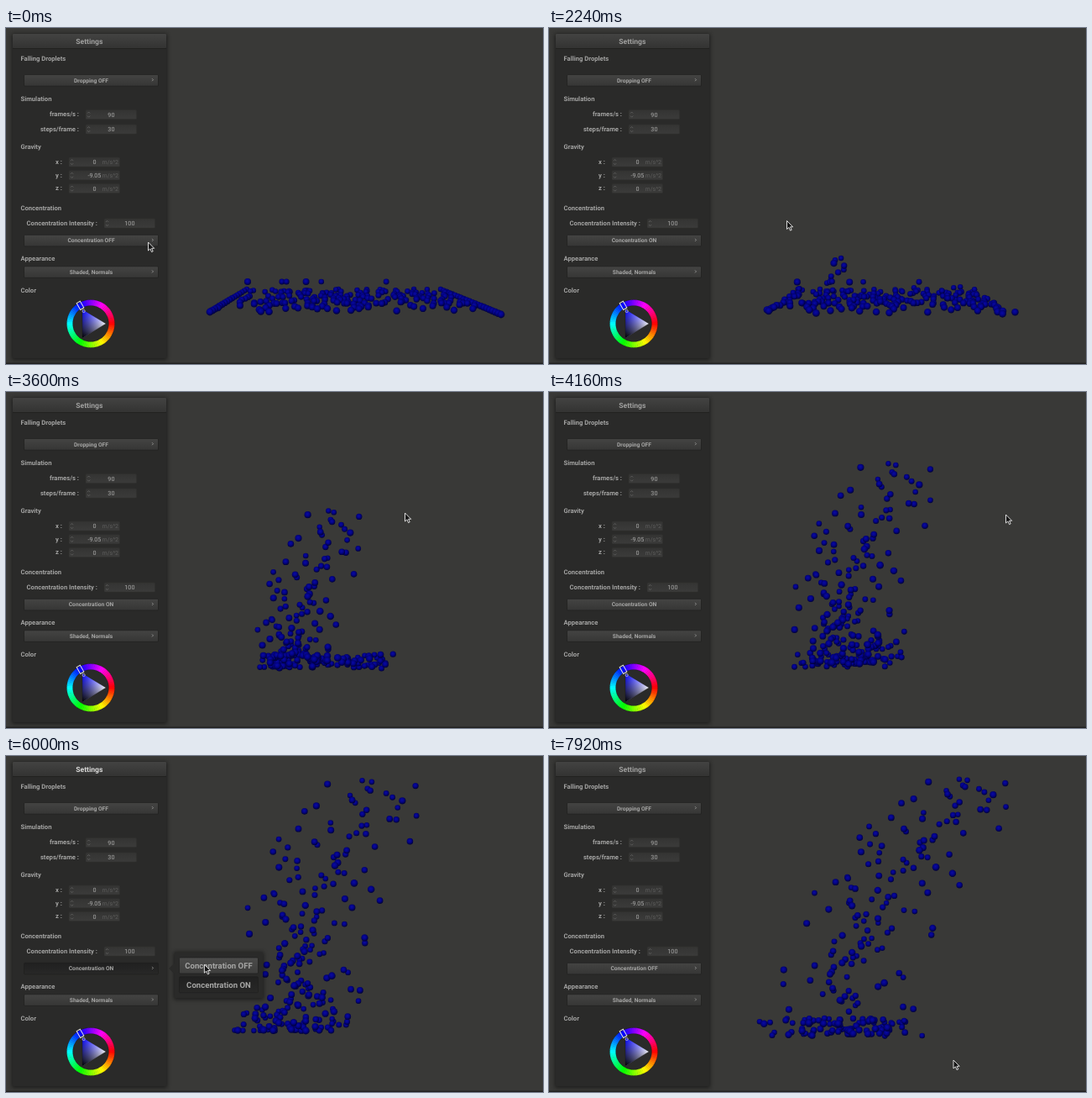
Write an HTML page that moves like this. It is 640 px wide and 400 px high and loops after 8 s.

```html
<!DOCTYPE html>
<html lang="en">
<head>
<meta charset="utf-8">
<title>Droplet simulation</title>
<style>
html, body { margin: 0; width: 100%; height: 100%; overflow: hidden; background: #393937; }
svg { display: block; width: 640px; height: 400px; font-family: Roboto, "Open Sans", sans-serif; text-rendering: geometricPrecision; }
</style>
</head>
<body>
<svg id="stage" viewBox="0 0 640 400" width="640" height="400">
  <defs>
    <linearGradient id="header" x2="0" y2="1"><stop stop-color="#434342"/><stop offset="1" stop-color="#333332"/></linearGradient>
    <linearGradient id="button" x2="0" y2="1"><stop stop-color="#444443"/><stop offset="1" stop-color="#363635"/></linearGradient>
    <linearGradient id="hover" x2="0" y2="1"><stop stop-color="#4b4b4a"/><stop offset="1" stop-color="#3e3e3d"/></linearGradient>
    <linearGradient id="pushed" x2="0" y2="1"><stop stop-color="#202020"/><stop offset="1" stop-color="#282827"/></linearGradient>
    <linearGradient id="field" x2="0" y2="1"><stop stop-color="#343433"/><stop offset="1" stop-color="#3b3b3a"/></linearGradient>
    <linearGradient id="tint" gradientUnits="userSpaceOnUse" x1="91" y1="335" x2="119" y2="352"><stop stop-color="#00f"/><stop offset="1" stop-color="#fff"/></linearGradient>
    <linearGradient id="shade" gradientUnits="userSpaceOnUse" x1="105" y1="343" x2="91" y2="369"><stop stop-color="#000" stop-opacity="0"/><stop offset="1" stop-color="#000"/></linearGradient>
    <radialGradient id="ball" cx=".45" cy=".4" r=".6"><stop stop-color="#0909a4"/><stop offset=".5" stop-color="#030386"/><stop offset="1" stop-color="#000036"/></radialGradient>
    <filter id="blur" x="-20%" y="-20%" width="140%" height="140%"><feGaussianBlur stdDeviation="2.8"/></filter>
  </defs>
</svg>
<script>
const stage = document.getElementById('stage');
const LOOP = 8000, STEP = 80;

function el(tag, attrs, parent = stage, text) {
  const node = document.createElementNS('http://www.w3.org/2000/svg', tag);
  for (const key in attrs) node.setAttribute(key, attrs[key]);
  if (text !== undefined) node.textContent = text;
  parent.appendChild(node);
  return node;
}
const rect = (x, y, width, height, fill, parent, more) =>
  el('rect', { x, y, width, height, fill, ...more }, parent);
const label = (x, y, text, size = 7.65, anchor = 'start', fill = '#a3a3a2', weight = 700, parent) =>
  el('text', { x, y, 'font-size': size, 'text-anchor': anchor, fill, 'font-weight': weight }, parent, text);

function panel(x, y, w, h, parent) {
  rect(x - 1, y, w + 2, h + 2, '#000', parent, { opacity: .5, filter: 'url(#blur)' });
  rect(x, y, w, h, '#2a2a29', parent, { rx: 1.2 });
}
function button(x, y, w, h, text, size, parent) {
  const box = rect(x, y, w, h, 'url(#button)', parent, { rx: 1.2, stroke: '#1f1f1e', 'stroke-width': .7 });
  const caption = label(x + w / 2, y + h / 2 + size * .35, text, size, 'middle', '#a6a6a5', 700, parent);
  return { box, caption };
}
function dropdown(y, text) {
  const made = button(21.5, y, 160, 13.6, text, 6.7);
  el('path', { d: `M174 ${y + 4.6}l1.5 1.5l-1.5 1.5`, fill: 'none', stroke: '#a0a09f', 'stroke-width': .8 });
  return made;
}
function numberField(name, x, cy, value, unit) {
  label(x - 8, cy + 2.3, name + ' :', 7.65, 'end');
  rect(x, cy - 5.4, 60.6, 11, 'url(#field)', stage, { rx: 1.2, stroke: '#30302f', 'stroke-width': .5 });
  el('path', { d: `M${x + 2} ${cy - 1.4}l1.6 -1.6l1.6 1.6M${x + 2} ${cy + 1.6}l1.6 1.6l1.6 -1.6`,
    fill: 'none', stroke: '#656564', 'stroke-width': .8 });
  label(x + 30.4, cy + 2.9, value, 7.2, 'middle', '#acacab', 400);
  if (unit) label(x + 59, cy + 2.6, unit, 7, 'end', '#5c5c5b', 400);
}

function colorWheel(cx, cy) {
  const at = (deg, r) => {
    const a = deg * Math.PI / 180;
    return `${(cx + r * Math.cos(a)).toFixed(2)} ${(cy + r * Math.sin(a)).toFixed(2)}`;
  };
  for (let h = 0; h < 360; h += 5)
    el('path', { d: `M${at(h - .4, 25)}A25 25 0 0 1 ${at(h + 5.4, 25)}`, fill: 'none',
      stroke: `hsl(${h + 2.5} 100% 50%)`, 'stroke-width': 7 });
  for (const r of [21.4, 28.6])
    el('circle', { cx, cy, r, fill: 'none', stroke: '#000', 'stroke-opacity': .3, 'stroke-width': .6 });
  const triangle = 'M91 335L119 352L91 369Z';
  el('path', { d: triangle, fill: 'url(#tint)' });
  el('path', { d: triangle, fill: 'url(#shade)', stroke: '#000', 'stroke-opacity': .35, 'stroke-width': .6 });
  el('rect', { x: 20.5, y: -2.4, width: 9, height: 4.8, fill: 'none', stroke: '#ddd', 'stroke-width': 1,
    transform: `translate(${cx} ${cy}) rotate(240)` });
  el('circle', { cx: 92.6, cy: 337, r: 1.6, fill: 'none', stroke: '#ccc', 'stroke-width': .8 });
}

function random(seed) {
  return () => {
    seed = (seed + 0x6D2B79F5) | 0;
    let v = Math.imul(seed ^ (seed >>> 15), 1 | seed);
    v = (v + Math.imul(v ^ (v >>> 7), 61 | v)) ^ v;
    return ((v ^ (v >>> 14)) >>> 0) / 4294967296;
  };
}

// Each droplet moves through one pose per time, eased between them.
const TIMES = [0, 1100, 1600, 2240, 3600, 4720, 7040, 7920];
const linear = p => p;
const EASES = [linear, linear, p => p * p, p => p ** 1.15, linear, linear, p => 1 - (1 - p) ** 1.35];

function makeDroplets() {
  const rnd = random(11), tri = () => rnd() + rnd() - 1;
  const above = (q, from) => Math.max(0, (q - from) / (1 - from));
  const count = 235, leftEdge = 16, rightEdge = 22;

  // The floor is a trapezoid seen in perspective; depth 1 is its back edge.
  function floorSpot(u, depth) {
    const left = 243 + 44 * depth, right = 590 - 72 * depth;
    return [left + (right - left) * u, 338 + 3 * u - (27 + 3 * u) * depth];
  }
  function gather([x, y], q, edge) {
    const lift = above(q, .96);
    if (lift) return [345 + tri() * 16, 306 - 35 * lift];
    const pull = edge ? .09 + .16 * rnd() : .1 + .04 * rnd();
    return [x + (350 - x) * pull, y + tri() * 3];
  }
  function column(q, side) {
    const v = above(q, .5);
    return v
      ? [345 + 55 * v ** 3 + side * (42 + 20 * v), 314 - 175 * v ** 2]
      : [318 + 145 * rnd() ** 1.7 + side * 20, 312 + 17 * rnd()];
  }
  function plume(q, side) {
    const h = q ** 2.1;
    return [346 + 105 * h ** 2 + side * (82 + 25 * h ** 3), 327 - 300 * h];
  }
  function release(q, side) {
    const v = above(q, .41);
    return v
      ? [352 + 160 * v ** 1.6 + side * 92, 305 - 279 * v]
      : [345 + 55 * rnd() ** 4 + side * 105, 312 + 22 * rnd()];
  }

  const droplets = Array.from({ length: count }, (_, n) => {
    // Height rank, shuffled so that it does not follow the floor order.
    const q = ((n * 89) % count + rnd()) / count, side = tri();
    let u = rnd(), depth = rnd() ** .65;
    const edge = n < leftEdge + rightEdge;
    if (n < leftEdge) { u = 0; depth = n / (leftEdge - 1); }
    else if (edge) { u = 1; depth = (n - leftEdge) / (rightEdge - 1); }

    const start = floorSpot(u, depth);
    if (!edge && n % 30 === 0) start[1] = 302;
    const rest = edge ? start : [start[0] + tri() * 3, start[1] + tri() * 2];
    const spread = plume(q, side);
    return {
      depth,
      r: 4.4 - 1.2 * depth,
      path: [start, rest, rest, gather(rest, q, edge), column(q, side), spread, spread, release(q, side)]
    };
  });
  droplets.sort((a, b) => b.depth - a.depth);
  for (const d of droplets) d.node = el('circle', { r: d.r.toFixed(2), fill: 'url(#ball)' });
  return droplets;
}

// Pointer moves: start time, end time, where it arrives.
const pointerHome = [169.5, 255];
const pointerMoves = [
  [480, 1040, 252.5, 277], [1600, 2240, 283.5, 229.5], [2240, 2960, 430, 138], [2960, 3600, 475.5, 144],
  [3600, 4000, 544.5, 146], [4880, 5440, 170, 253], [5680, 6080, 253, 247], [6320, 6720, 379, 271],
  [7120, 7840, 482, 362]
];
function pointerAt(t) {
  let [x, y] = pointerHome;
  for (const [from, to, toX, toY] of pointerMoves) {
    const p = Math.min(1, Math.max(0, (t - from) / (to - from)));
    x += (toX - x) * p;
    y += (toY - y) * p;
  }
  return [x, y];
}

rect(0, 0, 640, 400, '#393937');
const droplets = makeDroplets();
rect(0, 398.6, 640, 1.4, '#20201f');

panel(8, 7, 183, 386);
rect(8, 7, 183, 17, 'url(#header)', stage, { rx: 1.2 });
rect(8, 24, 183, .7, '#1d1d1c');
const title = label(99.3, 19, 'Settings', 8.6, 'middle');
label(17.5, 38.7, 'Falling Droplets');
dropdown(55.6, 'Dropping OFF');
label(17.5, 86.7, 'Simulation');
numberField('frames/s', 95, 103, '90');
numberField('steps/frame', 95, 120.5, '30');
label(17.5, 143.7, 'Gravity');
numberField('x', 75, 159.5, '0', 'm/s^2');
numberField('y', 75, 175.2, '-9.05', 'm/s^2');
numberField('z', 75, 191, '0', 'm/s^2');
label(17.5, 216.7, 'Concentration');
numberField('Concentration Intensity', 117, 232.4, '100');
const mode = dropdown(246.3, 'Concentration OFF');
label(17.5, 277.2, 'Appearance');
dropdown(283.8, 'Shaded, Normals');
label(17.5, 314.7, 'Color');
colorWheel(101, 352);

const popup = el('g', {});
const choiceTop = i => 240 + 22.8 * i, choiceHeight = 19;
panel(201, 233.5, 105, 54.5, popup);
el('path', { d: 'M201.5 246L194 253L201.5 260Z', fill: '#2a2a29' }, popup);
const choices = ['OFF', 'ON'].map((state, i) =>
  button(206.5, choiceTop(i), 94, choiceHeight, 'Concentration ' + state, 9.6, popup));

const pointer = el('path', { d: 'M0 0V10L2.4 7.9L4 11.6L5.7 10.9L4.1 7.3H7.2Z',
  fill: '#151515', stroke: '#eee', 'stroke-width': .9, 'stroke-linejoin': 'round' });

function render(t) {
  let seg = 0;
  while (seg < TIMES.length - 2 && t >= TIMES[seg + 1]) seg++;
  const p = EASES[seg]((t - TIMES[seg]) / (TIMES[seg + 1] - TIMES[seg]));
  for (const { node, path } of droplets) {
    const [x0, y0] = path[seg], [x1, y1] = path[seg + 1];
    node.setAttribute('cx', (x0 + (x1 - x0) * p).toFixed(2));
    node.setAttribute('cy', (y0 + (y1 - y0) * p).toFixed(2));
  }

  const open = (t >= 480 && t < 1680) || (t >= 5600 && t < 6320);
  const on = t >= 1680 && t < 6320;
  const [x, y] = pointerAt(t);
  title.setAttribute('fill', open ? '#dadad9' : '#a0a09f');
  mode.caption.textContent = 'Concentration ' + (on ? 'ON' : 'OFF');
  mode.box.setAttribute('fill', `url(#${open ? 'pushed' : 'button'})`);
  popup.setAttribute('visibility', open ? 'visible' : 'hidden');
  choices.forEach(({ box }, i) => {
    const over = x > 206 && x < 301 && y > choiceTop(i) && y < choiceTop(i) + choiceHeight;
    box.setAttribute('fill', `url(#${on === (i === 1) ? 'pushed' : over ? 'hover' : 'button'})`);
  });
  pointer.setAttribute('transform', `translate(${x.toFixed(1)} ${y.toFixed(1)})`);
}

const began = performance.now();
function tick() {
  const t = (performance.now() - began) % LOOP;
  render(Math.floor(t / STEP) * STEP);
  requestAnimationFrame(tick);
}
tick();
</script>
</body>
</html>
```
